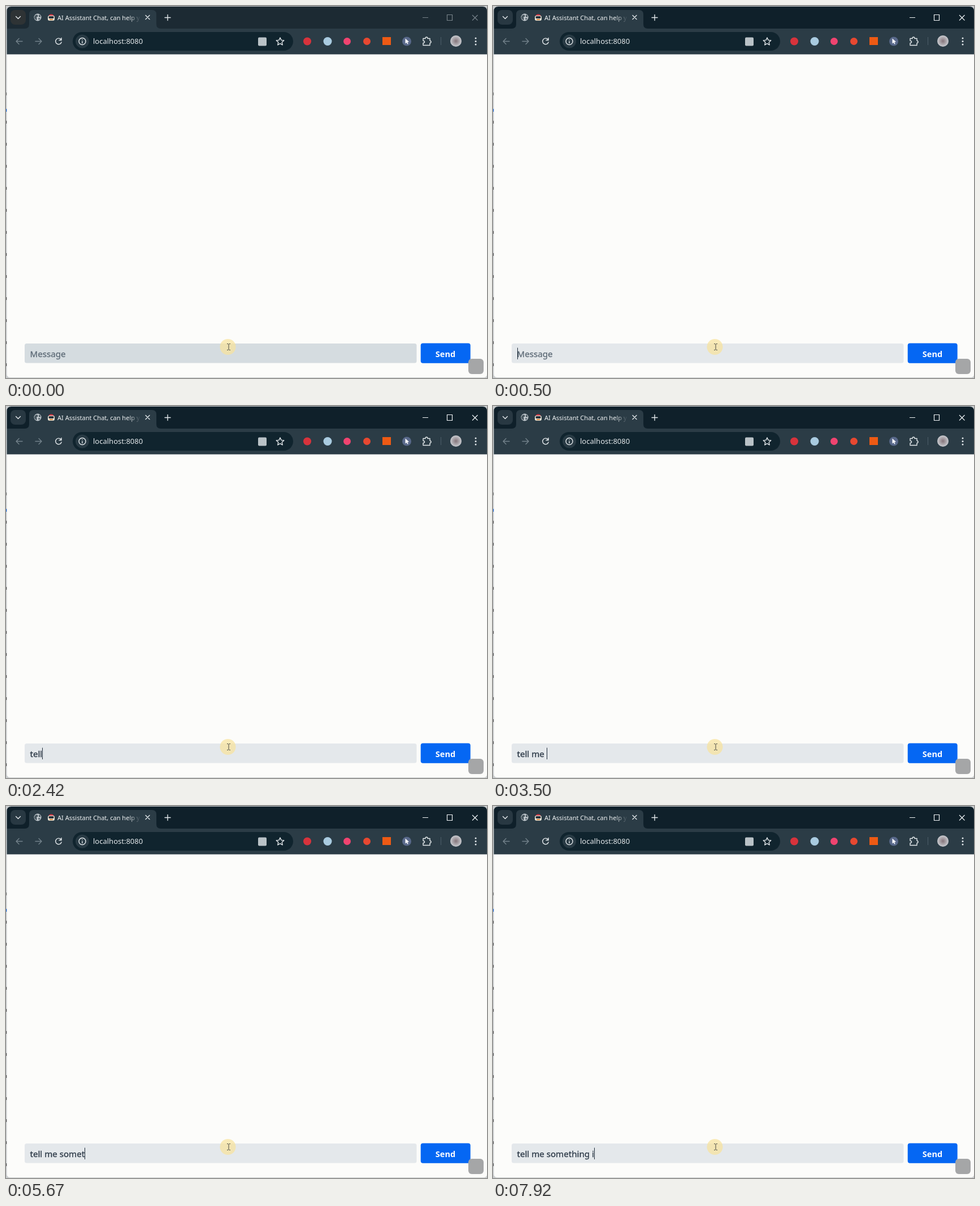
These frames come from a looping animation (851x658 px, 8 s). An HTML page:

```html
<!DOCTYPE html>
<html lang="en">
<head>
<meta charset="utf-8">
<title>Assistant chat</title>
<style>
  html, body { margin: 0; width: 100%; height: 100%; overflow: hidden; background: #fcfcfa; }
  svg { display: block; width: 851px; height: 658px; }
  text { font-family: "Noto Sans", "Open Sans", sans-serif; white-space: pre; }
  .line { fill: none; stroke: #e3e8eb; stroke-width: 1.4; stroke-linecap: round; stroke-linejoin: round; }
  .dim { stroke: #72818a; }
  .field { font-size: 15.1px; font-weight: 500; stroke: currentColor; stroke-width: .3; fill: currentColor; }
</style>
</head>
<body>
<svg viewBox="0 0 851 658">
  <defs>
    <linearGradient id="fade" gradientUnits="userSpaceOnUse" x1="216" x2="238" y1="0" y2="0">
      <stop stop-color="#f1f4f5"/><stop offset="1" stop-color="#f1f4f5" stop-opacity="0"/>
    </linearGradient>
    <radialGradient id="portrait">
      <stop stop-color="#85747a"/><stop offset=".55" stop-color="#a9a3a8"/><stop offset="1" stop-color="#c9cbd0"/>
    </radialGradient>
  </defs>

  <rect width="851" height="658" fill="#c9cccd"/>
  <g id="sliver"></g>
  <path d="M1.5 60H851V651q0 6-6 6H8q-6.500 0-6.500-6Z" fill="#fcfcfa"/>

  <!-- browser chrome -->
  <path id="titlebar" d="M1.500 40V9q0-8 8-8H843q8 0 8 8V40Z"/>
  <path d="M1.500 40H33q8 0 8-8V15q0-8 8-8H258q8 0 8 8V32q0 8 8 8H851V85.500H1.500Z" fill="#2b3c46"/>
  <rect id="tabsearch" x="8" y="7" width="27" height="26" rx="8"/>
  <path class="line" d="M17.500 18.500l4 4 4-4" stroke-width="1.700"/>
  <circle cx="56" cy="20" r="6.500" fill="#c3cbd0"/>
  <path d="M51 17l4-2 2 3-3 2 1 4-2 1-3-4ZM58 15l3 2 0 3-3-1ZM57 21l4 1-3 3Z" fill="#46555e"/>
  <g>
    <path d="M75.500 18q0-3.500 4.500-3.500t4.500 3.500Z" fill="#d43b46"/>
    <rect x="74" y="17" width="12" height="9" rx="3" fill="#e9e5d8"/>
    <rect x="75.500" y="18" width="9" height="4" rx="1.500" fill="#27313a"/>
    <rect x="77" y="23" width="6" height="2" fill="#d98a43"/>
  </g>
  <text x="91" y="24.500" font-size="11.050" fill="url(#fade)">AI Assistant Chat, can help y</text>
  <path class="line" d="M247 16.500l7 7m0-7l-7 7M281 20.500h10m-5-5v10"/>
  <g id="controls" fill="none" stroke-width="1.200">
    <path d="M737 20.500h10M780.500 15.500h9v10h-9ZM825 16l9.500 9.500m0-9.500l-9.500 9.500"/>
  </g>

  <path class="line dim" d="M29 62.500H18m5-5l-5 5 5 5M52 62.500h11m-5-5l5 5-5 5"/>
  <path class="line" d="M97.500 59.500a5.300 5.300 0 1 0 .6 4.500M98 56.500v4h-4" stroke-width="1.600"/>
  <rect x="118" y="46" width="390" height="33" rx="16.500" fill="#10242e"/>
  <circle cx="135" cy="62.500" r="12" fill="#283a44"/>
  <circle class="line" cx="135" cy="62.500" r="6"/>
  <path class="line" d="M135 62.500v3m0-6v.2"/>
  <text x="154" y="67.300" font-size="13" fill="#e5eaed">localhost:8080</text>
  <rect x="446" y="55.500" width="15" height="15" rx="2" fill="#b9c2c7"/>
  <path class="line" d="M485 56l2 4.400 4.800.5-3.600 3.200 1 4.800-4.200-2.500-4.200 2.500 1-4.800-3.600-3.200 4.800-.5Z"/>

  <circle cx="533" cy="62.500" r="7" fill="#d8333c"/>
  <circle cx="569" cy="62.500" r="7.500" fill="#a9cbe0"/>
  <circle cx="603.500" cy="62.500" r="6.500" fill="#f04470"/>
  <circle cx="638.500" cy="62.500" r="6.500" fill="#e74831"/>
  <rect x="666" y="55" width="15" height="14" fill="#ed5a14"/>
  <circle cx="709" cy="62.500" r="8" fill="#59698b"/>
  <path d="M706.500 57.500v9l2.200-2 1.500 3 1.500-.8-1.500-2.900 3-.3Z" fill="#fff"/>
  <path class="line" d="M738 57.500h4q0-2.500 2-2.500t2 2.500h4v4q2 0 2 2t-2 2v4h-12v-4q2.500 0 2.500-2t-2.500-2Z"/>
  <path d="M769.500 55v14" stroke="#4c5e69"/>
  <circle cx="796" cy="62" r="10" fill="url(#portrait)"/>
  <g fill="#e3e8eb"><circle cx="831" cy="57" r="1.500"/><circle cx="831" cy="62.500" r="1.500"/><circle cx="831" cy="68" r="1.500"/></g>

  <!-- message bar -->
  <rect id="field" x="33" y="597" width="693.500" height="34.500" rx="3.500"/>
  <text id="message" class="field" x="42.500" y="620.500"></text>
  <path id="caret" d="M.5 604.500V625" stroke="#1c2937"/>
  <rect x="733.700" y="596.500" width="88" height="35.300" rx="4" fill="#0567f3"/>
  <text x="777.500" y="620.500" text-anchor="middle" font-size="14.500" font-weight="600" fill="#fff">Send</text>
  <rect x="818" y="624" width="27" height="27" rx="6" fill="#a5a6a7"/>

  <circle cx="392.500" cy="603" r="14" fill="#f8e29a" opacity=".7"/>
  <path d="M391 597.500h2l1 1 1-1h2M394 598.500v9M391 608.500h2l1-1 1 1h2" fill="none" stroke="#4a4a42"/>
</svg>
<script>
const LOOP = 8000;
const PHRASE = "tell me something i";
const KEY_TIMES = [1250, 1500, 2000, 2330, 2790, 3000, 3250, 3500, 3920, 4500,
                   4880, 5250, 5670, 6000, 6580, 6920, 7420, 7670, 7920];
const FOCUS = 60;
const BLINK = 500;

const byId = id => document.getElementById(id);
const [sliver, titlebar, tabsearch, controls, field, message, caret] =
  ["sliver", "titlebar", "tabsearch", "controls", "field", "message", "caret"].map(byId);

const mix = (from, to, k) =>
  `rgb(${from.map((v, i) => Math.round(v + (to[i] - v) * k))})`;
const progress = (t, start, end) => {
  const k = Math.min(1, Math.max(0, (t - start) / (end - start)));
  return k * k * (3 - 2 * k);
};

// The strip of another window visible along the left edge
const mark = (y, color) =>
  `<rect y="${y}" width="1.500" height="5" fill="${color}"/>`;
sliver.innerHTML = mark(153, "#777") + mark(182, "#1763d2") +
  Array.from({ length: 12 }, (_, i) => mark(203 + 39 * i, "#555")).join("");

function draw(t) {
  const active = progress(t, 40, 300);
  titlebar.setAttribute("fill", mix([28, 42, 51], [15, 32, 42], active));
  tabsearch.setAttribute("fill", mix([46, 51, 53], [40, 56, 66], active));
  controls.setAttribute("stroke", mix([119, 130, 137], [239, 243, 245], active));
  field.setAttribute("fill", mix([213, 220, 224], [228, 232, 235], progress(t, 40, 500)));

  const count = KEY_TIMES.filter(time => time <= t).length;
  message.textContent = count ? PHRASE.slice(0, count) : "Message";
  message.style.color = count ? "#2c3947" : "#5d6a76";

  const lastInput = count ? KEY_TIMES[count - 1] : FOCUS;
  const idle = t - lastInput;
  // The blink restarts with every key; short pauses while typing keep it lit
  const lit = count ? idle < 600 : idle >= 0 && idle % (2 * BLINK) < BLINK;
  caret.style.visibility = lit ? "visible" : "hidden";
  const x = 42.5 + (count ? message.getComputedTextLength() : 0);
  caret.setAttribute("transform", `translate(${Math.round(x)})`);
}

const start = performance.now();
function tick() {
  draw((performance.now() - start) % LOOP);
  requestAnimationFrame(tick);
}
tick();
</script>
</body>
</html>
```
